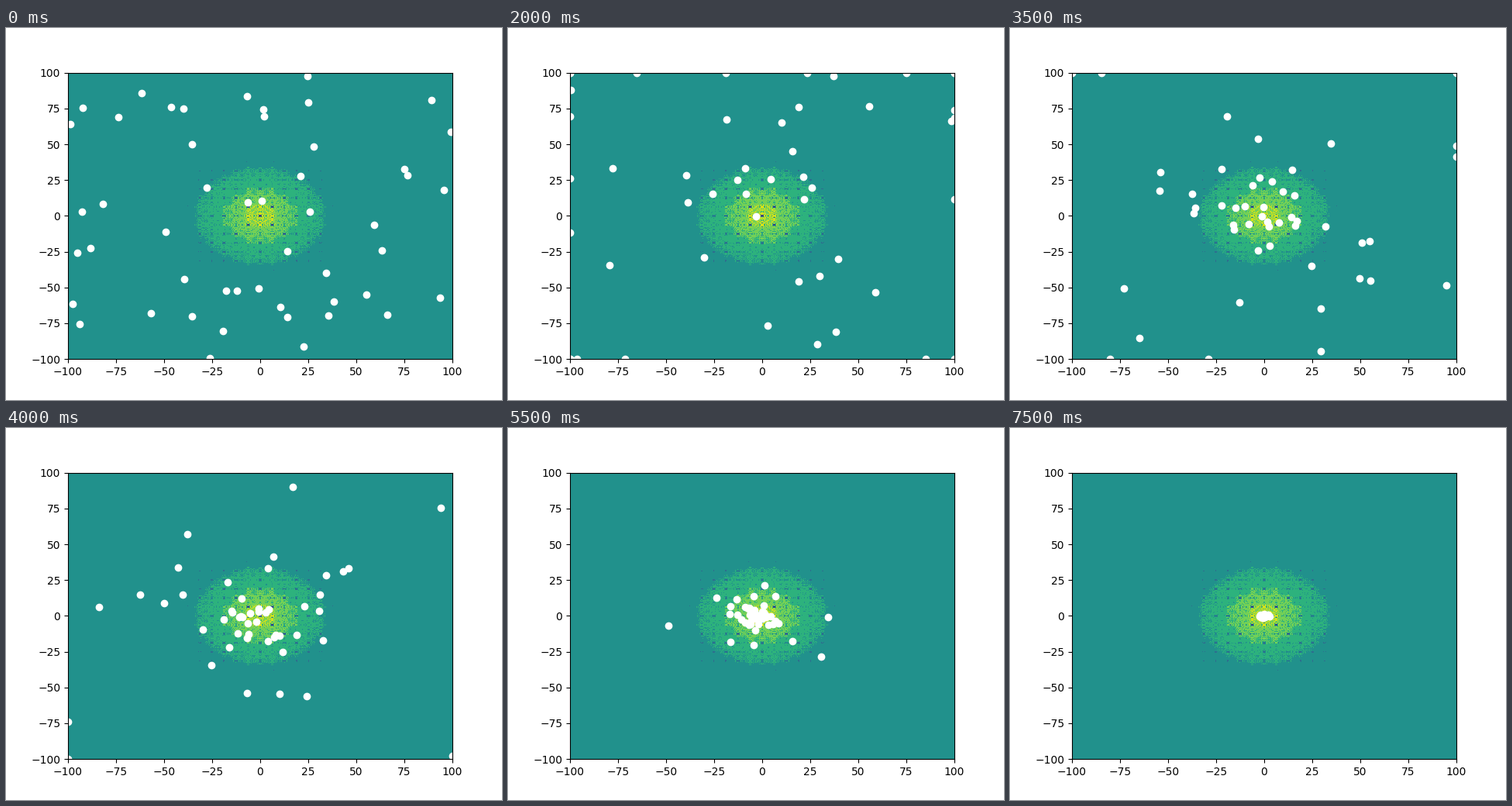
Recreate the animation shown at these times as a matplotlib script. Size 640x480 px, loop 7750 ms.

```python
import numpy as np
import matplotlib.pyplot as plt
from matplotlib.animation import FuncAnimation

STEPS = 31
INTERVAL = 250
BOUND = 100
COUNT = 50

rng = np.random.default_rng(7)
start = rng.uniform(-BOUND, BOUND, (COUNT, 2))
swing = rng.normal(0, 65, (COUNT, 2))
omega = rng.uniform(1.1, 1.8, (COUNT, 2))
decay = np.array([0.0049, 0.0055]) * rng.uniform(0.95, 1.3, (COUNT, 1))
spread = rng.normal(0, 0.9, (COUNT, 1))


def schaffer(x, y):
    """Schaffer function N. 2."""
    return 0.5 + (np.sin(x**2 - y**2)**2 - 0.5) / (1 + 0.001 * (x**2 + y**2))**2


def swarm(k):
    """Particles overshoot the optimum, stop at the bounds and settle."""
    middle = np.sin(np.pi * k / (STEPS - 1))
    size = np.exp(0.7 * (1 - np.exp(-k)) - decay * k**2 + spread * middle)
    wave = start * np.cos(omega * k) + swing * np.sin(omega * k)
    centre = np.array([-2.5, 0]) * middle
    return np.clip(centre + size * wave, -BOUND, BOUND)


fig, ax = plt.subplots(figsize=(6.4, 4.8), dpi=100)
grid = np.linspace(-BOUND, BOUND, 801)
X, Y = np.meshgrid(grid, grid)
field = ax.contourf(X, Y, schaffer(X, Y))
ax.set(xlim=(-BOUND, BOUND), ylim=(-BOUND, BOUND))

# The contour is slow to draw, so render it once and reuse the picture
ax.set_axis_off()
fig.canvas.draw()
backdrop = np.array(fig.canvas.buffer_rgba())
field.remove()
ax.set_axis_on()
ax.patch.set_visible(False)
fig.figimage(backdrop, zorder=-1)

dots, = ax.plot([], [], "wo")


def update(k):
    dots.set_data(*swarm(k).T)
    return dots,


anim = FuncAnimation(fig, update, frames=STEPS, interval=INTERVAL,
                     repeat=True, repeat_delay=0)
plt.show()
```
